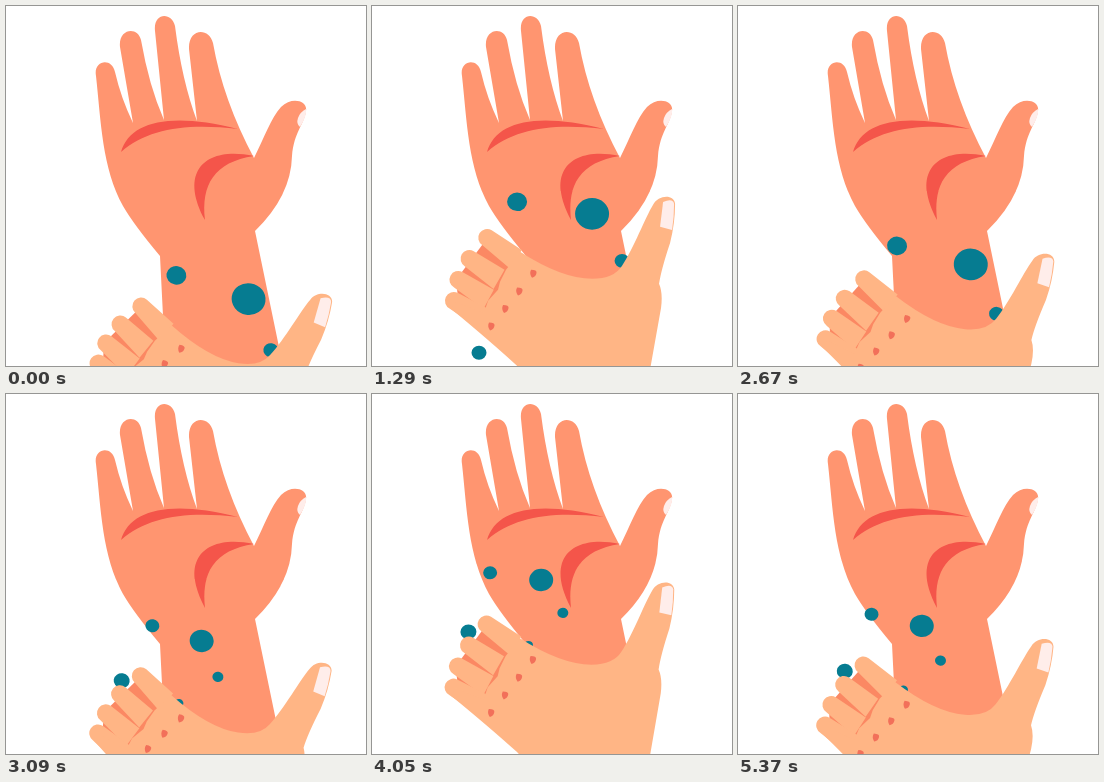
Animation of 360 by 360 pixels, one loop 5400 ms. Source, as an HTML page:

```html
<!DOCTYPE html>
<html lang="en">
<head>
<meta charset="utf-8">
<title>Hand washing</title>
<style>
  html, body { margin: 0; width: 100%; height: 100%; overflow: hidden; background: #fff; }
  svg { display: block; width: 100vw; height: 100vh; }
</style>
</head>
<body>
<svg viewBox="0 0 360 360">
  <g id="backHand">
    <path fill="#ff9570" d="M154 250 Q128 219 117 200 C96 162 95 115 90 70 C87 54 106 51 109 66
      Q115 92 127 117 L114 41 C112 22 132 20 135 34 Q143 80 158 114 L149 25 C147 6 166 6 169 20
      Q176 75 191 115 L183 43 C182 22 203 21 207 37 Q217 94 248 152 C258 132 265 112 275 101
      C286 90 302 95 300 105 C298 119 288 126 286 150 Q285 190 249 225 L279 370 L160 370 Z"/>
    <path fill="#f4554a" d="M115 146 C124 115 165 106 232 123 C182 117 142 122 115 146 Z"/>
    <path fill="#f4554a" d="M248 150 C203 140 171 162 199 214 C195 179 208 156 248 150 Z"/>
    <path fill="#ffedea" d="M300 103 Q301 110 294 121 Q290 118 292 112 Q294 106 300 103 Z"/>
  </g>
  <g id="frontHand">
    <g id="germsA" fill="#067c91"></g>
    <g id="germsB" fill="#067c91"></g>
    <path fill="#fb8863" d="M111 236 L84 272 L86 290 L125 308 L150 262 Z"/>
    <g id="fingers" fill="#ffb585"></g>
    <path fill="#ffb585" d="M148 244 Q190 271 220 271 Q242 271 250 258 C262 240 273 210 281 197
      C286 187 302 186 303 196 Q303 215 298 235 Q289 262 287 276 Q291 285 289 300 L278 362 L268 430
      L215 430 L145 358 Q120 335 79 301 L84 294 L112 305 L116 293 L126 282 L128 274 L134 262 Z"/>
    <path fill="#ffedea" d="M291 194 Q301 190 302 196 Q302 209 300 222 L288 219 Z"/>
    <g id="knuckles" fill="#f2705a"></g>
  </g>
</svg>
<script>
const LOOP = 5400, SECOND_PASS = 2730, PASS_END = 2670, PEAK = 1770;

const el = id => document.getElementById(id);
const germ = (x, y, r) => `<ellipse cx="${x}" cy="${y}" rx="${r}" ry="${r * 0.93}"/>`;

el('germsA').innerHTML = germ(220, 206, 17) + germ(145, 194, 10) + germ(250, 253, 7.5) + germ(107, 345, 7.5);
el('germsB').innerHTML = germ(170, 186, 12) + germ(119, 178.5, 7) + germ(191.5, 219, 5.5) +
  germ(97, 237.5, 8) + germ(157, 251, 4.5);

// Four fingers fan out from the palm, each with a knuckle mark
for (let i = 0; i < 4; i++) {
  const tipX = 115 - 21 * i + 3.3 * i * i, tipY = 230 + 21 * i;
  el('fingers').innerHTML += `<path transform="translate(${tipX} ${tipY}) rotate(${32 - 2 * i})"
    d="M36 -8 L0 -8.8 A8.8 8.8 0 0 0 0 8.8 L36 14 Z"/>`;
  el('knuckles').innerHTML += `<path transform="translate(${161 - 14 * i} ${266 + 17.6 * i})"
    d="M-2 -4 Q4 -4 3.5 -1 Q3 3 -1 4 Q-4 0 -2 -4 Z"/>`;
}

const mix = (a, b, p) => a + (b - a) * p;
const smoother = p => p * p * p * (p * (6 * p - 15) + 10);

// The hand climbs to PEAK while turning, then slides back down
function pose(t) {
  if (t < PEAK) {
    const u = t / PEAK;
    return {
      lift: mix(76, -13.5, u + 1.3 * u ** 4 * (1 - u)),
      angle: mix(9, -2.2, smoother(u ** 1.25))
    };
  }
  const u = (t - PEAK) / (PASS_END - PEAK);
  return { lift: mix(-13.5, 46.7, u ** 1.08), angle: mix(-2.2, 5, u ** 1.4) };
}

function render(now) {
  const time = now % LOOP;
  const second = time >= SECOND_PASS;
  const { lift, angle } = pose(second ? time - SECOND_PASS : Math.min(time, PASS_END));
  el('frontHand').setAttribute('transform', `translate(0 ${lift}) rotate(${angle} 161 355)`);
  el('germsA').setAttribute('display', second ? 'none' : 'inline');
  el('germsB').setAttribute('display', second ? 'inline' : 'none');
}

const start = performance.now();
function tick() {
  render(performance.now() - start);
  requestAnimationFrame(tick);
}
tick();
</script>
</body>
</html>
```
